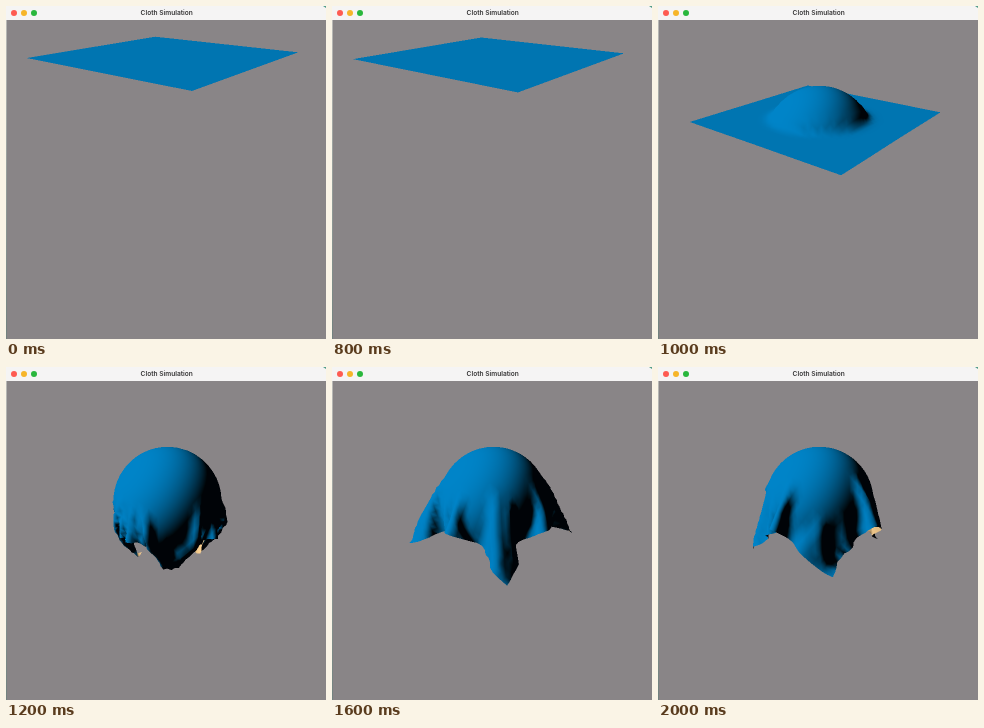
An HTML page with a canvas for the animation above (2100 ms loop, 320 by 333 pixels).

```html
<!DOCTYPE html>
<html lang="en">
<head>
<meta charset="utf-8">
<title>Cloth Simulation</title>
<style>
  html, body { margin: 0; width: 100%; height: 100%; overflow: hidden; background: #898587; }
  svg, canvas { position: absolute; left: 0; top: 0; display: block; width: 100vw; height: 100vh; }
  text { font: 600 6.6px Inter, "Liberation Sans", sans-serif; fill: #363536; text-anchor: middle; }
</style>
</head>
<body>
<svg viewBox="0 0 320 333" preserveAspectRatio="none">
  <defs>
    <linearGradient id="edge" x1="0" x2="0" y1="0" y2="1">
      <stop offset="0" stop-color="#b9b9b6"/>
      <stop offset="1" stop-color="#72827f"/>
    </linearGradient>
  </defs>
  <rect width="320" height="333" fill="#898587"/>
  <rect y="13" width="1" height="320" fill="url(#edge)"/>
  <rect width="320" height="14" fill="#f5f4f4"/>
  <path d="M317 0H320V2Z" fill="#4f9b86"/>
  <circle cx="8" cy="7" r="3" fill="#fe5b52"/>
  <circle cx="18" cy="7" r="3" fill="#f6b52a"/>
  <circle cx="28" cy="7" r="3" fill="#2ab73d"/>
  <text x="160.7" y="9.2">Cloth Simulation</text>
</svg>
<canvas id="view" width="640" height="666"></canvas>
<script>
// Lengths are in units of the sphere's radius; x right, y up, z to the viewer.
const STEP = 100, LOOP = 2100;            // ms
const RELEASE = 772, DT = 1.25;           // ms
const GRID = 32, SIDE = GRID + 1, COUNT = SIDE * SIDE;
const HALF_DIAG = 2.28, YAW = 0.117, START_HEIGHT = 1.543;
const GRAVITY = 43, STIFF = 24000, DAMP = 40, DRAG = 0.5, GRIP = 0.97;

const pos = new Float64Array(COUNT * 3);
const vel = new Float64Array(COUNT * 3);
const at = (i, j) => (j * SIDE + i) * 3;

function layCloth() {
  const cos = Math.cos(YAW), sin = Math.sin(YAW);
  for (let j = 0; j < SIDE; j++) {
    for (let i = 0; i < SIDE; i++) {
      const u = 2 * i / GRID - 1, v = 2 * j / GRID - 1;
      const right = HALF_DIAG * (u + v) / 2, back = HALF_DIAG * (v - u) / 2;
      pos.set([right * cos - back * sin, START_HEIGHT, -right * sin - back * cos], at(i, j));
    }
  }
}

function makeSprings() {
  const list = [], cell = HALF_DIAG * Math.SQRT2 / GRID;
  const link = (i, j, di, dj, k) => {
    const x = i + di, y = j + dj;
    if (x < 0 || x > GRID || y > GRID) return;
    list.push({ a: at(i, j), b: at(x, y), rest: cell * Math.hypot(di, dj), k });
  };
  for (let j = 0; j < SIDE; j++) {
    for (let i = 0; i < SIDE; i++) {
      for (const [di, dj] of [[1, 0], [0, 1], [1, 1], [-1, 1]]) link(i, j, di, dj, STIFF);
      for (const [di, dj] of [[2, 0], [0, 2]]) link(i, j, di, dj, STIFF * 0.1);
    }
  }
  return list;
}

function pull({ a, b, rest, k }, dt) {
  const x = pos[b] - pos[a], y = pos[b + 1] - pos[a + 1], z = pos[b + 2] - pos[a + 2];
  const len = Math.sqrt(x * x + y * y + z * z) || 1e-9;
  const speed = (x * (vel[b] - vel[a]) + y * (vel[b + 1] - vel[a + 1]) + z * (vel[b + 2] - vel[a + 2])) / len;
  const f = (k * (len - rest) + DAMP * speed) / len * dt;
  vel[a] += f * x; vel[a + 1] += f * y; vel[a + 2] += f * z;
  vel[b] -= f * x; vel[b + 1] -= f * y; vel[b + 2] -= f * z;
}

// Push a point out of the sphere, drop its inward speed and slow its slide.
function collide(p) {
  const r = Math.hypot(pos[p], pos[p + 1], pos[p + 2]);
  if (r >= 1) return;
  for (let c = p; c < p + 3; c++) pos[c] /= r;
  const inward = Math.min(0, vel[p] * pos[p] + vel[p + 1] * pos[p + 1] + vel[p + 2] * pos[p + 2]);
  for (let c = p; c < p + 3; c++) vel[c] = (vel[c] - inward * pos[c]) * GRIP;
}

function advance(dt) {
  for (const s of springs) pull(s, dt);
  const keep = 1 - DRAG * dt;
  for (let p = 0; p < pos.length; p += 3) {
    vel[p + 1] -= GRAVITY * dt;
    for (let c = p; c < p + 3; c++) {
      vel[c] *= keep;
      pos[c] += vel[c] * dt;
    }
    collide(p);
  }
}

layCloth();
const springs = makeSprings();
const poses = [pos.slice()];

function poseAt(step) {
  while (poses.length <= step) {
    const end = poses.length * STEP;
    for (let t = end - STEP; t < end; t += DT) if (t >= RELEASE) advance(DT / 1000);
    poses.push(pos.slice());
  }
  return poses[step];
}

// Camera and light
const SCALE = 2, FOCAL = 370, PITCH = 0.494, DISTANCE = 6.911;
const LIGHT = [-0.72, 0.66, 0.21];
const OUTER = [0, 132, 200], LINING = [250, 208, 145], SHADOW = [0, 3, 7];

const canvas = document.getElementById('view');
const ctx = canvas.getContext('2d');
const W = canvas.width, H = canvas.height;
const depth = new Float32Array(W * H);

function project(p, o) {
  const cos = Math.cos(PITCH), sin = Math.sin(PITCH);
  const near = 1 / (DISTANCE - sin * p[o + 1] - cos * p[o + 2]);
  return {
    x: SCALE * (160 + FOCAL * (p[o] + 0.027) * near),
    y: SCALE * (173 - FOCAL * (0.711 + cos * p[o + 1] - sin * p[o + 2]) * near),
    near
  };
}

function lightAt(p, i, j) {
  const span = (a, b) => [0, 1, 2].map(c => p[b + c] - p[a + c]);
  const [ux, uy, uz] = span(at(Math.max(i - 1, 0), j), at(Math.min(i + 1, GRID), j));
  const [vx, vy, vz] = span(at(i, Math.max(j - 1, 0)), at(i, Math.min(j + 1, GRID)));
  const n = [uy * vz - uz * vy, uz * vx - ux * vz, ux * vy - uy * vx];
  return (n[0] * LIGHT[0] + n[1] * LIGHT[1] + n[2] * LIGHT[2]) / (Math.hypot(...n) || 1);
}

function triangle(data, a, b, c) {
  const area = (b.x - a.x) * (c.y - a.y) - (c.x - a.x) * (b.y - a.y);
  if (!area) return;
  const outside = area < 0, tint = outside ? OUTER : LINING;
  const xs = [a.x, b.x, c.x], ys = [a.y, b.y, c.y];
  const x0 = Math.max(0, Math.floor(Math.min(...xs))), x1 = Math.min(W - 1, Math.ceil(Math.max(...xs)));
  const y0 = Math.max(0, Math.floor(Math.min(...ys))), y1 = Math.min(H - 1, Math.ceil(Math.max(...ys)));
  for (let y = y0; y <= y1; y++) {
    for (let x = x0; x <= x1; x++) {
      const px = x + 0.5 - a.x, py = y + 0.5 - a.y;
      const kb = (px * (c.y - a.y) - (c.x - a.x) * py) / area;
      const kc = ((b.x - a.x) * py - px * (b.y - a.y)) / area;
      const ka = 1 - kb - kc;
      if (ka < 0 || kb < 0 || kc < 0) continue;
      const near = ka * a.near + kb * b.near + kc * c.near, at = y * W + x;
      if (near <= depth[at]) continue;
      depth[at] = near;
      const lit = ka * a.lit + kb * b.lit + kc * c.lit;
      const glow = 1 - (1 - Math.max(0, outside ? lit : -lit)) ** 2;
      for (let k = 0; k < 3; k++) data[at * 4 + k] = Math.max(SHADOW[k], tint[k] * glow);
      data[at * 4 + 3] = 255;
    }
  }
}

function draw(p) {
  const image = ctx.createImageData(W, H), points = [];
  depth.fill(0);
  for (let j = 0; j < SIDE; j++) {
    for (let i = 0; i < SIDE; i++) points.push({ ...project(p, at(i, j)), lit: lightAt(p, i, j) });
  }
  for (let j = 0; j < GRID; j++) {
    for (let i = 0; i < GRID; i++) {
      const n = j * SIDE + i;
      triangle(image.data, points[n], points[n + 1], points[n + SIDE]);
      triangle(image.data, points[n + 1], points[n + SIDE + 1], points[n + SIDE]);
    }
  }
  ctx.putImageData(image, 0, 0);
}

let last = -1;
function frame() {
  const step = Math.floor(performance.now() % LOOP / STEP);
  if (step !== last) {
    last = step;
    draw(poseAt(step));
  }
  requestAnimationFrame(frame);
}
frame();
</script>
</body>
</html>
```
